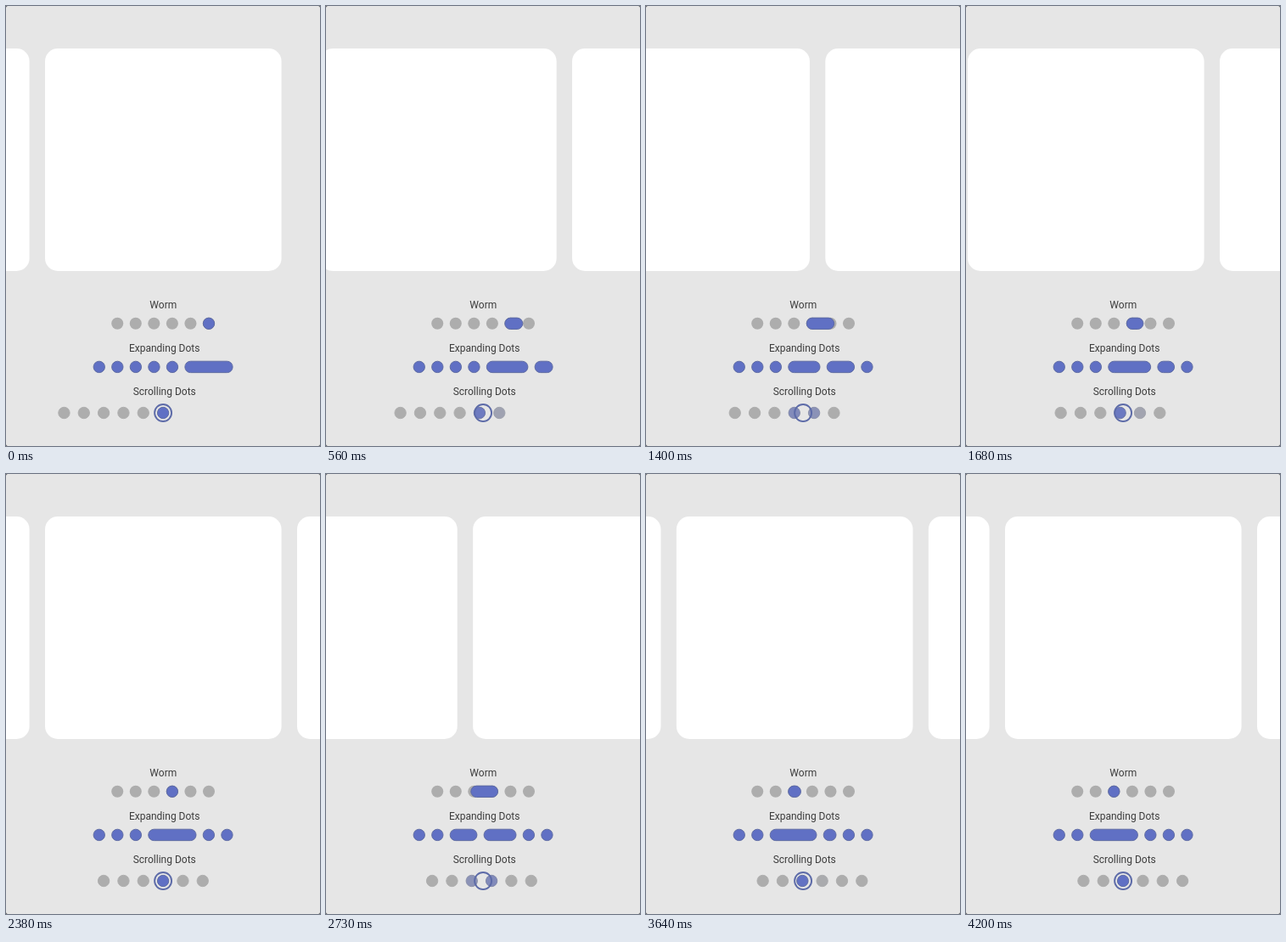
Animation of 370x518 px, one loop 4270 ms. Source, as an HTML page:

```html
<!DOCTYPE html>
<html lang="en">
<head>
<meta charset="utf-8">
<title>Pagination dots</title>
<style>
  html, body { margin: 0; width: 100%; height: 100%; overflow: hidden; background: #333; }
  svg { display: block; width: 370px; height: 518px; }
  text { font: 12px Roboto, Inter, sans-serif; fill: #3c3c3c; text-anchor: middle; }
  .blue { fill: #6070c4; stroke: #5a679f; stroke-width: .9; }
</style>
</head>
<body>
<svg id="stage" viewBox="0 0 370 518">
  <rect width="370" height="518" rx="2" fill="#e6e6e6"/>
  <g id="cards" fill="#fff"></g>
  <text x="185.3" y="356">Worm</text>
  <g id="worm"></g>
  <text x="186.7" y="407">Expanding Dots</text>
  <g id="expanding"></g>
  <text x="186.7" y="458">Scrolling Dots</text>
  <g id="scrolling"></g>
</svg>
<script>
const LOOP = 4270, STEP = 70, COUNT = 6;
const CENTER = 185.1, DOT = 14.3, PITCH = 21.55, WIDE = 57.2;
const CARD_X = 46, CARD_W = 278.6, CARD_PITCH = 297;
const SCROLL_PITCH = 23.33;
const GREY = [173, 173, 173], BLUE = [96, 112, 196], EDGE = [90, 103, 159];

const clamp = v => Math.min(1, Math.max(0, v));
const mix = (a, b, k) => `rgb(${a.map((v, i) => Math.round(v + (b[i] - v) * k))})`;

function add(parent, name, attrs) {
  const node = document.createElementNS('http://www.w3.org/2000/svg', name);
  set(node, attrs);
  document.getElementById(parent).append(node);
  return node;
}
function set(node, attrs) {
  for (const key in attrs) node.setAttribute(key, attrs[key]);
}
const repeat = make => Array.from({ length: COUNT }, (_, i) => make(i));

// A pill whose outline is drawn inside its box.
const pill = (parent, y) => add(parent, 'rect', {
  class: 'blue', y: y - DOT / 2 + .45, height: DOT - .9, rx: DOT / 2 - .45
});
const spanPill = (node, x, width) => set(node, { x: x + .45, width: width - .9 });

const cards = repeat(() => add('cards', 'rect', { y: 50, width: CARD_W, height: 262, rx: 15 }));

const wormX = i => CENTER + (i - (COUNT - 1) / 2) * PITCH;
repeat(i => add('worm', 'circle', { cx: wormX(i), cy: 373.8, r: DOT / 2 - .1, fill: '#adadad' }));
const worm = pill('worm', 373.8);

const bars = repeat(() => pill('expanding', 424.9));

const dots = repeat(() => add('scrolling', 'circle', { cy: 479, r: 6.7, 'stroke-width': .9 }));
add('scrolling', 'circle', {
  cx: CENTER, cy: 479, r: 10, fill: 'none', stroke: '#5d6ba8', 'stroke-width': 1.9
});

// Distance still to travel, from 1 (not begun) to 0 (arrived).
const easeOut = (t, start, duration) => (1 - clamp((t - start) / duration)) ** 3;
function slowSwipe(t) {
  const flick = 1 - (t - 2434) / 86 * .211;
  const settle = .13 * (Math.max(0, 3934 - t) / 574) ** 2;
  return clamp(Math.max(flick, t < 2434 ? 1 : settle));
}
const pageAt = t => 2 + easeOut(t, 66, 1130) + easeOut(t, 1115, 1200) + slowSwipe(t);

function draw(page) {
  const index = Math.floor(page), part = page - index;

  cards.forEach((card, i) => set(card, { x: CARD_X + (i - page) * CARD_PITCH }));

  const tail = clamp(2 * part - 1) * PITCH, head = clamp(2 * part) * PITCH;
  spanPill(worm, wormX(index) + tail - DOT / 2, DOT + head - tail);

  let x = CENTER - ((COUNT - 1) * PITCH + WIDE) / 2;
  for (let i = 0; i < COUNT; i++) {
    const active = clamp(1 - Math.abs(page - i));
    const width = DOT + (WIDE - DOT) * active;
    spanPill(bars[i], x, width);
    x += width + PITCH - DOT;
    set(dots[i], {
      cx: CENTER + (i - page) * SCROLL_PITCH,
      fill: mix(GREY, BLUE, active),
      stroke: mix(GREY, EDGE, active)
    });
  }
}

const begin = performance.now();
function tick() {
  const t = (performance.now() - begin) % LOOP;
  draw(pageAt(Math.floor(t / STEP) * STEP));
  requestAnimationFrame(tick);
}
tick();
</script>
</body>
</html>
```
